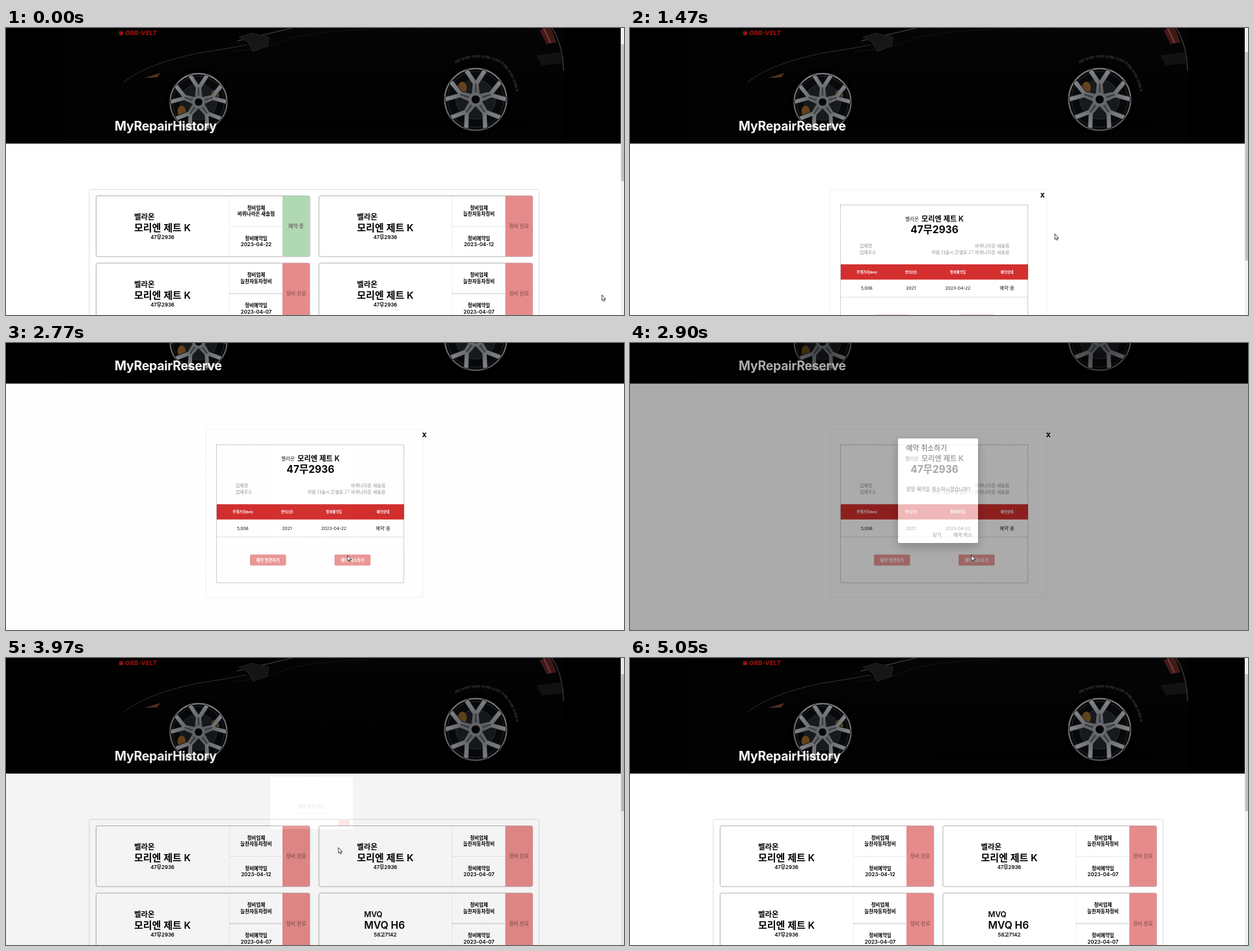
These frames come from a looping animation (950 by 442 pixels, 5970 ms). An HTML page:

```html
<!DOCTYPE html>
<html lang="ko">
<head>
<meta charset="utf-8">
<title>Repair reservation</title>
<style>
  html, body { margin: 0; width: 100%; height: 100%; overflow: hidden; background: #fff; }
  svg { display: block; width: 100%; height: 100%; }
  text { font-family: Inter, "Noto Sans CJK KR", "Noto Sans CJK", sans-serif; white-space: pre; }
  .title { letter-spacing: -.25px; }
  .brand { font-style: italic; }
</style>
</head>
<body>
<svg id="stage" viewBox="0 0 950 442"></svg>
<script>
const LOOP = 5970;
const OPEN_PANEL = 670, OPEN_DIALOG = 2770, CLOSE_DIALOG = 3630, ALERT = 3950, CLOSE_ALERT = 4790, END = 5050;
const MAKER = '벨라온', MODEL = '모리엔 제트 K', PLATE = '47무2936';
const SHOP = '바퀴나라온 새솔점', GARAGE = '늘찬자동차정비';

const text = (x, y, size, weight, str, fill = '#000', anchor = 'middle') =>
  `<text x="${x}" y="${y}" font-size="${size}" font-weight="${weight}" fill="${fill}" text-anchor="${anchor}">${str}</text>`;
const rect = (x, y, w, h, fill, extra = '') =>
  `<rect x="${x}" y="${y}" width="${w}" height="${h}" fill="${fill}" ${extra}/>`;
const path = (d, fill, extra = '') => `<path d="${d}" fill="${fill}" ${extra}/>`;
const line = (d, stroke, extra = '') => path(d, 'none', `stroke="${stroke}" ${extra}`);

function wheel(cx, cy, r, calipers) {
  const spoke = path('M-7-8L-5-24L-18-44L-11-47L0-30L11-47L18-44L5-24L7-8Z', 'url(#metal)', 'stroke="#17181a"') +
    line('M0-10V-25', '#3a3c40', 'stroke-width="2.5"');
  const spokes = [0, 72, 144, 216, 288].map(a => `<g transform="rotate(${a})">${spoke}</g>`).join('');
  const brakes = calipers.map(([x, y]) => `<ellipse cx="${x}" cy="${y}" rx="7" ry="10" fill="#63431b"/>`).join('');
  return `<g transform="translate(${cx} ${cy}) scale(${r / 50})">
    <circle r="57" fill="#000"/>
    <circle r="48.5" fill="#08090a" stroke="url(#metal)" stroke-width="2.2"/>
    <circle r="44" fill="none" stroke="#2a2c2f"/>
    <circle r="31" fill="#17191d" stroke="#2c2f33"/>
    ${brakes}${spokes}
    <circle r="11" fill="#66696d"/><circle r="6.5" fill="#060607"/></g>`;
}

function header(title) {
  return rect(0, -10, 950, 188, '#000') + rect(90, -10, 768, 184, '#020203') +
    path('M175 100Q178 80 250 51Q350 20 440-4L852-4Q862 60 853 140L780 158L340 152L190 146Z', 'url(#body)') +
    line('M180 84C205 64 250 47 300 38Q340 32 370 26', '#2f3134') +
    line('M355 20Q400 10 455-4', '#4a4c4f') +
    line('M345 36Q390 34 425 20T560 2', '#131416') +
    path('M358 14L378 8L404 14L402 28L380 36L372 22Z', '#151618', 'stroke="#2b2d30" stroke-width=".8"') +
    path('M212 77L238 69L232 76Z', '#54301f') +
    path('M820 3L837-2L846 22L831 25Z', '#421917') + line('M826-1L837 23', '#6d4340', 'stroke-width="2"') +
    line('M838-2Q856 24 857 66', '#38393b', 'stroke-width="1.5"') +
    path('M815 42L854 37L855 54L824 58Z', '#111214') +
    wheel(296, 114, 45, [[28, -11], [-29, 16]]) + wheel(722, 110, 49, [[-21, -18]]) +
    line('M690 53Q725 34 762 53Q782 72 786 98', '#1d1f21', 'stroke-width="4" stroke-dasharray="9 2 4 1"') +
    rect(174, 5, 6, 6, '#8c150d') +
    `<g class="brand">${text(183, 11, 9.6, 800, 'ORB-VELT', '#8c150d', 'start')}</g>` +
    rect(0, 174, 950, 4, '#000') +
    `<g class="title">${text(167, 158, 19.4, 700, title, '#fff', 'start')}</g>`;
}

const booking = (date, extra = {}) =>
  ({ maker: MAKER, model: MODEL, plate: PLATE, shop: GARAGE, size: 15, left: 59, date, ...extra });
const bookings = [
  booking('2023-04-22', { shop: SHOP, pending: true }),
  booking('2023-04-12'), booking('2023-04-07'), booking('2023-04-07'),
  booking('2023-04-07', { maker: 'MVQ', model: 'MVQ H6', plate: '58고7142', size: 15.6, left: 70 })
];

function card(b, i) {
  const x = 138 + (i % 2) * 342.5, y = 258 + (i >> 1) * 103.5;
  return `<g transform="translate(${x} ${y})">` +
    rect(.5, .5, 328.5, 93.5, '#fff', 'rx="2.5" stroke="#b0b0b0"') +
    line('M205.5 1V94', '#ddd', 'stroke-dasharray="1 1"') +
    line('M205 47.5H287', i > 1 ? '#aaa' : '#ddd', 'stroke-dasharray="2 1"') +
    path('M287 .5H327Q329 .5 329 2.5V92Q329 94 327 94H287Z', b.pending ? '#afd8b3' : '#e68b8b') +
    text(b.left, 37, b.size * .76, 600, b.maker, '#000', 'start') +
    text(b.left, 55, b.size, 600, b.model, '#000', 'start') +
    text(102.5, 67, 7.8, 600, b.plate) +
    text(246.5, 21.7, 7.5, 600, '정비업체') + text(246.5, 31.3, 7.5, 600, b.shop) +
    text(246.5, 68.8, 7.5, 600, '정비예약일') + text(246.5, 78.3, 7.9, 600, b.date) +
    text(308, 50, 7.8, 600, b.pending ? '예약 중' : '정비 완료', b.pending ? '#76716f' : '#a15f5d') + '</g>';
}

const history = list => header('MyRepairHistory') +
  rect(128, 248.5, 691.5, 300, '#fff', 'rx="2" stroke="#dcdcdc"') + list.map(card).join('');

function reserve() {
  const columns = [[364, '주행거리(km)', '5,006'], [432, '연식(년)', '2021'],
    [504, '정비예약일', '2023-04-22'], [579.5, '예약상태', '예약 중']];
  const button = (x, label) => rect(x, 441.5, 55.5, 17, '#e99997', 'rx="2"') +
    text(x + 27.7, 452.4, 6.3, 700, label, '#fff');
  const grey = (x, y, str, anchor) => text(x, y, 6.9, 300, str, '#909090', anchor);
  return header('MyRepairReserve') +
    rect(307.5, 248.5, 333, 259, 'none', 'stroke="#e4e4e4" stroke-dasharray="1 1"') +
    `<g id="closeMark">${text(634, 261, 9.5, 800, 'X')}</g>` +
    rect(323.5, 272.5, 288, 212.5, 'none', 'stroke="#b4b4b4" stroke-dasharray="2 1"') +
    text(423, 296.8, 7.6, 400, MAKER, '#222', 'start') +
    text(448, 298, 11.2, 600, MODEL, '#000', 'start') +
    text(468, 316.2, 15.5, 700, PLATE) +
    grey(353, 338, '업체명', 'start') + grey(583, 338, SHOP, 'end') +
    grey(353, 348, '업체주소', 'start') + grey(583, 348, '하람 다솔시 은별로 27 ' + SHOP, 'end') +
    rect(324, 364, 288, 23.5, '#d32f2f') +
    columns.map(([x, head, value]) => text(x, 378, 5.3, 700, head, '#fff') +
      text(x, 403.4, /\d/.test(value) ? 6.6 : 7.4, 400, value, '#111')).join('') +
    line('M324 414.5H611', '#dedede') +
    button(375, '예약 변경하기') + button(505, '예약 취소하기');
}

const dialog = rect(0, 0, 950, 442, '#000', 'opacity=".5"') +
  rect(412, 147, 123, 161, '#fff', 'rx="2" filter="url(#shadow)"') +
  text(424.5, 166, 10.8, 400, '예약 취소하기', '#222', 'start') +
  text(424.5, 227.5, 7.6, 400, '정말 예약을 취소하시겠습니까?', '#666', 'start') +
  text(472, 297.6, 7.4, 400, '닫기', '#56657a') + text(511.5, 297.6, 7.4, 400, '예약 취소', '#56657a');

const ring = (id, extra) =>
  `<circle id="${id}" r="21" fill="none" stroke="#a5dc86" stroke-width="2.2" pathLength="360" ${extra}/>`;
const alertBox = rect(0, 0, 950, 442, '#000', 'opacity=".4"') + '<g id="popup">' +
  rect(351, 149, 237.5, 149, '#fff', 'rx="2.5"') +
  '<g transform="translate(470 187)">' + ring('ringBase', 'opacity=".25"') + ring('ringArc', '') +
  line('M-12 1L-3 10L15-8', '#a5dc86', 'id="check" stroke-width="2.6" stroke-linecap="round" pathLength="100"') + '</g>' +
  text(470, 238, 12.5, 600, '정비 예약 취소', '#5c5c5c') +
  text(470, 255.7, 7.5, 400, '예약 취소가 완료되었습니다.', '#85837f') +
  rect(548, 273, 30, 16.5, '#fc0000', 'rx="2"') + text(563, 283.7, 6.6, 700, 'OK', '#fff') + '</g>';

const stage = document.getElementById('stage');
stage.innerHTML = `<defs>
  <linearGradient id="body" x2="0" y2="1"><stop stop-color="#050506"/><stop offset="1" stop-color="#010101"/></linearGradient>
  <linearGradient id="metal" x2="0" y2="1"><stop stop-color="#85878a"/><stop offset="1" stop-color="#585b5f"/></linearGradient>
  <filter id="shadow" x="-30%" y="-30%" width="160%" height="160%"><feDropShadow dx="0" dy="6" stdDeviation="8" flood-opacity=".45"/></filter>
  </defs>
  <g id="before">${history(bookings.slice(0, 4))}</g>
  <g id="panel">${reserve()}</g>
  <g id="after">${history(bookings.slice(1))}</g>
  <g id="bar">${rect(945, 0, 5, 442, '#f1f1f1')}${rect(945.5, 0, 4.5, 0, '#c1c1c1', 'id="thumb"')}</g>
  <g id="dialog">${dialog}</g>
  <g id="alert">${alertBox}</g>
  <g id="cursor">${path('M0 0V8.6L2 6.9L3.3 9.8L4.6 9.2L3.4 6.4H6Z', '#fff', 'stroke="#111" stroke-width=".8"')}</g>`;

const parts = Object.fromEntries([...stage.querySelectorAll('[id]')].map(e => [e.id, e]));
const set = (id, name, value) => parts[id].setAttribute(name, value);
const show = (id, on) => set(id, 'display', on ? 'inline' : 'none');
const progress = (t, from, to) => Math.min(1, Math.max(0, (t - from) / (to - from)));
const smooth = p => p * p * (3 - 2 * p);

// Interpolates rows of [time, ...values].
function track(rows, t) {
  const next = rows.findIndex(row => row[0] > t);
  if (next < 0) return rows[rows.length - 1].slice(1);
  if (next === 0) return rows[0].slice(1);
  const a = rows[next - 1], b = rows[next], p = smooth(progress(t, a[0], b[0]));
  return a.slice(1).map((v, i) => v + (b[i + 1] - v) * p);
}

const cursorPath = [[70, 916, 411], [600, 405, 320], [1210, 405, 320], [1470, 653, 317], [1750, 639.5, 310.5],
  [1820, 639.5, 310.5], [2360, 530, 331], [2700, 525, 327], [3030, 525, 327], [3360, 511, 264],
  [3560, 511, 292], [4160, 511, 292], [4310, 516.5, 281], [4600, 562, 282]];
const scrollPath = [[1470, 0], [1750, 113], [1820, 113], [2000, 115.7]];
const popupScale = [[0, .5], [135, 1.05], [240, .95], [300, 1]];

function draw(t) {
  const onPanel = t >= OPEN_PANEL && t < ALERT;
  const [scroll] = track(scrollPath, t);
  show('before', t < OPEN_PANEL);
  show('panel', onPanel);
  show('after', t >= ALERT);
  set('panel', 'transform', `translate(0 ${-scroll})`);

  const locked = t >= OPEN_DIALOG && t < CLOSE_DIALOG + 195;
  show('bar', !locked);
  set('thumb', 'y', onPanel ? 37 + scroll * .69 : 25);
  set('thumb', 'height', onPanel ? 321 : 211);
  set('closeMark', 'transform', `translate(${locked ? 9 : 0} 0)`);

  show('dialog', locked);
  set('dialog', 'opacity', progress(t, OPEN_DIALOG, OPEN_DIALOG + 200) - progress(t, CLOSE_DIALOG, CLOSE_DIALOG + 195));

  const age = t - ALERT;
  show('alert', age >= 0 && t < END);
  set('alert', 'opacity', progress(age, 0, 200) - progress(t, CLOSE_ALERT, END));
  const [scale] = track(popupScale, age);
  set('popup', 'transform', `translate(470 223.5) scale(${scale}) translate(-470 -223.5)`);

  // The arc grows back from its end, then shrinks towards its start.
  const turn = progress(age, 212, 510) * 360;
  const start = turn < 180 ? 150 - turn : -30;
  const length = turn < 180 ? turn : 360 - turn;
  show('ringArc', length > 0);
  set('ringArc', 'transform', `rotate(${start - 90})`);
  set('ringArc', 'stroke-dasharray', `${length} 360`);
  show('check', age > 405);
  set('check', 'stroke-dasharray', `${progress(age, 405, 700) * 100} 200`);

  const [x, y] = track(cursorPath, t);
  show('cursor', t < END);
  set('cursor', 'transform', `translate(${x} ${y})`);
}

const startTime = performance.now();
function tick() {
  draw((performance.now() - startTime) % LOOP);
  requestAnimationFrame(tick);
}
tick();
</script>
</body>
</html>
```
